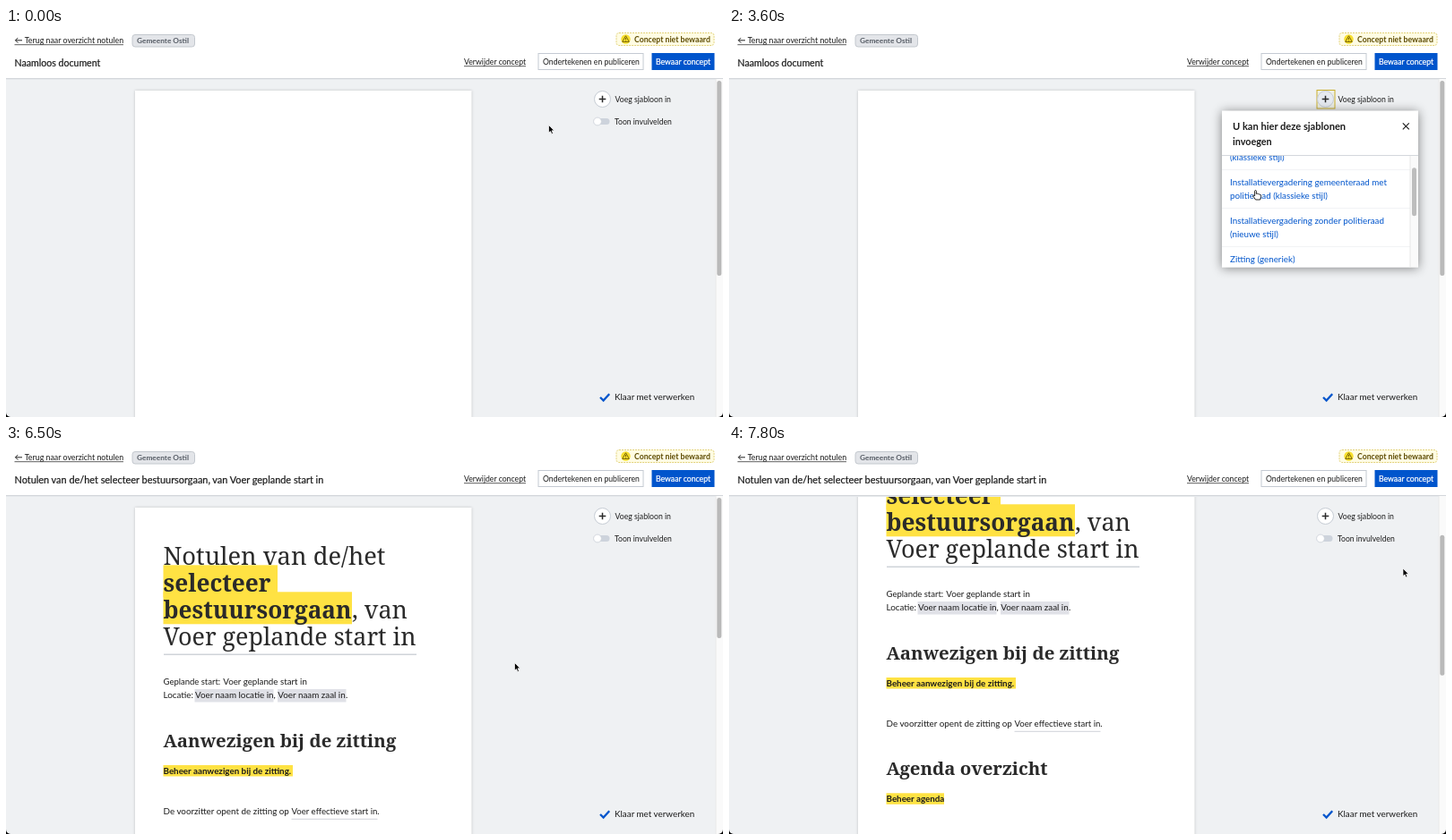
Animation of 800x435 px, one loop 8000 ms. Source, as an HTML page:

```html
<!DOCTYPE html>
<html lang="nl">
<head>
<meta charset="utf-8">
<style>
html, body { margin: 0; width: 100%; height: 100%; overflow: hidden; background: #eff1f3; }
svg { display: block; }
text { font-family: Lato, "Open Sans", sans-serif; fill: #1c1c1c; white-space: pre; }
.bold { font-weight: 700; }
.medium { stroke: #1c1c1c; stroke-width: .22; }
.medium.light { stroke: #fff; }
.serif { font-family: "Noto Serif", "Liberation Serif", serif; font-weight: 300; fill: #2a2a2a; }
.slab { font-family: "Noto Serif", "Liberation Serif", serif; font-weight: 700; fill: #2a2a2a; }
.link { fill: #0055cc; }
#sheet { filter: drop-shadow(0 0 1.5px #0003); }
#card { filter: drop-shadow(0 1px 6px #0007); }
</style>
</head>
<body>
<svg id="stage" width="800" height="435" viewBox="0 0 800 435"></svg>
<script>
const LOOP = 8000, OPEN = 2200, BLUR = 5000, LOAD = 5300;
const YELLOW = '#ffe243', GREY = '#e0e1e7', LINE = '#cfd3d9', BLUE = '#0055cc';

const text = (x, y, size, str, cls = '', fill = '') =>
  `<text x="${x}" y="${y}" font-size="${size}" class="${cls}"${fill && ` style="fill:${fill}"`}>${str}</text>`;
const rect = (x, y, w, h, fill, extra = '') =>
  `<rect x="${x}" y="${y}" width="${w}" height="${h}" fill="${fill}" ${extra}/>`;
const path = (d, stroke, width = 1, fill = 'none', extra = '') =>
  `<path d="${d}" stroke="${stroke}" stroke-width="${width}" fill="${fill}" ${extra}/>`;
const group = (id, body, extra = '') => `<g id="${id}" ${extra}>${body}</g>`;

const page = group('page',
  rect(144, 70, 375.5, 900, '#fff', 'id="sheet"') +
  group('content',
    rect(175.5, 134.3, 127.5, 36, YELLOW) + rect(175.5, 164.3, 210.5, 36, YELLOW) +
    text(175.5, 133.5, 27.3, 'Notulen van de/het', 'serif') +
    text(175.5, 163.5, 26.2, 'selecteer', 'slab') +
    text(175.5, 193.5, 26.2, 'bestuursorgaan', 'slab') +
    text(386, 193.5, 27, ', van', 'serif') +
    text(175.5, 223.5, 26.9, 'Voer geplande start in', 'serif') +
    path('M176 234.3H458', LINE, 1.5) +
    text(175.5, 268.3, 9.5, 'Geplande start:') +
    text(242.3, 268.3, 9.75, 'Voer geplande start in') +
    rect(210.5, 273, 88, 14.5, GREY) + rect(303, 273, 76.5, 14.5, GREY) +
    text(175.5, 283.3, 9.85, 'Locatie:') +
    text(211, 283.3, 9.85, 'Voer naam locatie in') + text(298.5, 283.3, 9.85, ',') +
    text(303.3, 283.3, 9.85, 'Voer naam zaal in') + text(379, 283.3, 9.85, '.') +
    text(175.5, 337.5, 20.4, 'Aanwezigen bij de zitting', 'slab') +
    rect(175.5, 358, 144.5, 12.5, YELLOW) +
    text(175.5, 367.6, 9.8, 'Beheer aanwezigen bij de zitting.', 'bold') +
    text(175.5, 412.5, 9.85, 'De voorzitter opent de zitting op') +
    text(318.5, 412.5, 9.65, 'Voer effectieve start in') + text(414.3, 412.5, 9.85, '.') +
    path('M318.5 418.3H414.5', LINE) +
    text(175.5, 466.7, 20.4, 'Agenda overzicht', 'slab') +
    rect(175.5, 487.3, 64.5, 12.5, YELLOW) +
    text(175.5, 496.9, 9.8, 'Beheer agenda', 'bold')));

const header =
  rect(0, 0, 800, 56, '#fff') + path('M0 56.5H800', '#d3d6da') + path('M0 57.5H800', '#e6e9ec') +
  path('M18 13.8H10.5M13.3 11L10.5 13.8L13.3 16.6', '#222', 1) +
  text(20.7, 17, 8.85, 'Terug naar overzicht notulen') + path('M9.5 18.7H131', '#333', .8) +
  rect(141, 7.5, 69.5, 13.5, '#e3e5e9', 'rx="3" stroke="#c3c8ce"') +
  text(146, 17.3, 8.3, 'Gemeente Ostil', 'bold', '#565c65') +
  `<text id="title" x="9.5" y="43" class="medium"></text>` +
  text(511, 41, 8.7, 'Verwijder concept') + path('M511 42.7H580', '#333', .8) +
  rect(594, 28.5, 117, 18, '#fff', 'stroke="#c4cad2"') +
  text(599, 41, 8.65, 'Ondertekenen en publiceren') +
  rect(720.5, 28, 70, 19, BLUE) + text(725, 41, 8.7, 'Bewaar concept', 'medium light', '#fff') +
  rect(681, 5.5, 109, 14, '#fffce3', 'rx="3" stroke="#e2d27a" stroke-dasharray="2 1"') +
  '<circle cx="691.5" cy="12.5" r="5.2" fill="#f7df2e"/>' +
  path('M691.5 8.8L695.3 15.4H687.7ZM691.5 11V13.2M691.5 13.9V14.6', '#6b5700', .9) +
  text(701, 16, 8.7, 'Concept niet bewaard', 'bold', '#5f4d05');

const tools =
  rect(656, 69.5, 20, 20.5, '#eef0e6', 'id="focus" stroke="#c9ae2c"') +
  '<circle id="plus" cx="665.5" cy="79.5" r="9" stroke="#c6ccd4"/>' +
  path('M665.5 75.7V83.3M661.7 79.5H669.3', '#2a2a2a', 1.5) +
  text(679.5, 82.6, 8.7, 'Voeg sjabloon in') +
  rect(656, 101, 17.5, 7, '#cdd3dc', 'rx="3.5"') +
  '<circle cx="660" cy="104.5" r="4.4" fill="#fff" stroke="#c9ced6" stroke-width=".8"/>' +
  text(679, 107.7, 8.6, 'Toon invulvelden') +
  path('M663 413L666.6 416.6L673.2 409.2', BLUE, 2.3) +
  text(679, 416.3, 9.85, 'Klaar met verwerken');

const rows = [
  ['Installatievergadering zonder politieraad', '(klassieke stijl)'],
  ['Installatievergadering gemeenteraad met', 'politieraad (klassieke stijl)'],
  ['Installatievergadering zonder politieraad', '(nieuwe stijl)'],
  ['Zitting (generiek)'],
  ['Eerste vergadering OCMW-raad (klassieke', 'stijl)']
];
let rowTop = 142.5;
const list = rows.map(lines => {
  const top = rowTop, height = 13 + 15 * lines.length;
  rowTop += height;
  return `<g class="row" data-top="${top}" data-end="${rowTop}">` +
    rect(550, top, 210, height, '#fff') + path(`M550 ${rowTop}H760`, '#e3e6e9') +
    lines.map((s, i) => text(559, top + 17 + 15 * i, 9.8, s, 'link')).join('') + '</g>';
}).join('');

const panel = group('panel',
  rect(550, 92.5, 219, 175, '#fff', 'id="card"') +
  text(562, 113.7, 11.1, 'U kan hier deze sjablonen', 'bold') +
  text(562, 130.5, 10.8, 'invoegen', 'bold') +
  path('M751.8 106.3L758.8 113.3M758.8 106.3L751.8 113.3', '#222', 1.2) +
  `<g clip-path="url(#view)">${group('list', list)}</g>` +
  path('M550 142.5H769', '#d3d7dc') +
  rect(760, 143, 9, 124.5, '#fafafa') + path('M760 143V267', '#e6e6e6') +
  rect(762, 144, 5, 54, '#bdbdbd', 'rx="2.5" id="listThumb"'));

const scrollbar = rect(792, 57, 8, 378, '#fafafa') + path('M792 57V435', '#e8e8e8') +
  rect(793.3, 59, 5, 218, '#b9b9b9', 'rx="2.5" id="pageThumb"');

const arrow = path('M0 0V8.6L2 6.9L3.4 10L4.9 9.3L3.5 6.3H6.2Z', '#fff', .7, '#000', 'id="arrow"');
const hand = path('M-.9 .9C-.9-.3 .9-.3 .9 .9V4C1.6 3.3 2.7 3.6 2.8 4.3C3.6 3.8 4.5 4.2 4.6 4.9' +
  'C5.4 4.6 6.1 5 6.1 5.8C6.1 8 5.6 8.8 5.2 10.5H0C-.6 9-2 7.8-2.7 6.6C-3.1 5.6-1.8 5.2-.9 6.4Z',
  '#111', .9, '#fff', 'id="hand" stroke-linejoin="round"');

const $ = id => document.getElementById(id);
$('stage').innerHTML =
  '<defs><clipPath id="view"><rect x="550" y="143" width="219" height="124.5"/></clipPath></defs>' +
  rect(0, 0, 800, 435, '#eff1f3') + page + header + tools + scrollbar + panel +
  path('M0 430V435H5A5 5 0 0 1 0 430M800 430V435H795A5 5 0 0 0 800 430', 'none', 0, '#000') +
  group('cursor', arrow + hand);
const rowNodes = [...document.querySelectorAll('.row')];

// Keys are [time, ...values]; each stretch is eased.
function track(keys, t) {
  const i = keys.findIndex(k => k[0] > t);
  if (i < 0) return keys[keys.length - 1].slice(1);
  if (i === 0) return keys[0].slice(1);
  const a = keys[i - 1], b = keys[i], p = (t - a[0]) / (b[0] - a[0]);
  const e = p * p * (3 - 2 * p);
  return a.slice(1).map((v, n) => v + (b[n + 1] - v) * e);
}

const mouse = [
  [0, 605.5, 108.5], [900, 605.5, 108.5], [1800, 659.5, 80], [2750, 659.5, 80],
  [3300, 587.5, 181.5], [4200, 587.5, 181.5], [4800, 583, 229], [5400, 583, 229],
  [6200, 567.5, 243.5], [6500, 567.5, 243.5], [7050, 752, 138]
];
const listScroll = [[3300, 0], [3950, 59.5], [4200, 59.5], [4500, 62.5]];
const pageScroll = [[7050, 0], [7400, 54.3], [7800, 98]];

const show = (id, on) => $(id).setAttribute('display', on ? 'inline' : 'none');
const shift = (id, x, y) => $(id).setAttribute('transform', `translate(${x} ${y})`);

function draw(t) {
  const [x, y] = track(mouse, t), [ls] = track(listScroll, t), [ps] = track(pageScroll, t);
  const loaded = t >= LOAD, open = t >= OPEN && !loaded;
  const focused = t >= OPEN && t < BLUR;
  const onPlus = Math.hypot(x - 665.5, y - 79.5) < 10;
  const onList = open && y > 143;
  const scrolling = t > 3300 && t < 4500;

  shift('cursor', x, y);
  show('hand', onPlus || onList);
  show('arrow', !onPlus && !onList);
  show('focus', focused);
  $('plus').setAttribute('fill', onPlus || focused ? '#e6eaf0' : '#fff');

  show('panel', open);
  shift('list', 0, -ls);
  shift('listThumb', 0, ls * .46);
  for (const row of rowNodes) {
    const ly = y + ls + 4;
    const hover = onList && !scrolling && ly >= row.dataset.top && ly < row.dataset.end;
    row.firstChild.setAttribute('fill', hover ? '#eff1f3' : '#fff');
    row.querySelectorAll('text').forEach(n => n.style.fill = hover ? '#2f74c8' : BLUE);
  }

  show('content', loaded);
  shift('page', 0, -ps);
  shift('pageThumb', 0, ps * .427);
  $('pageThumb').setAttribute('height', loaded ? 157 : 218);
  $('title').textContent = loaded
    ? 'Notulen van de/het selecteer bestuursorgaan, van Voer geplande start in'
    : 'Naamloos document';
  $('title').setAttribute('font-size', loaded ? 10.9 : 10.6);
}

const start = performance.now();
function tick() {
  draw((performance.now() - start) % LOOP);
  requestAnimationFrame(tick);
}
tick();
</script>
</body>
</html>
```
